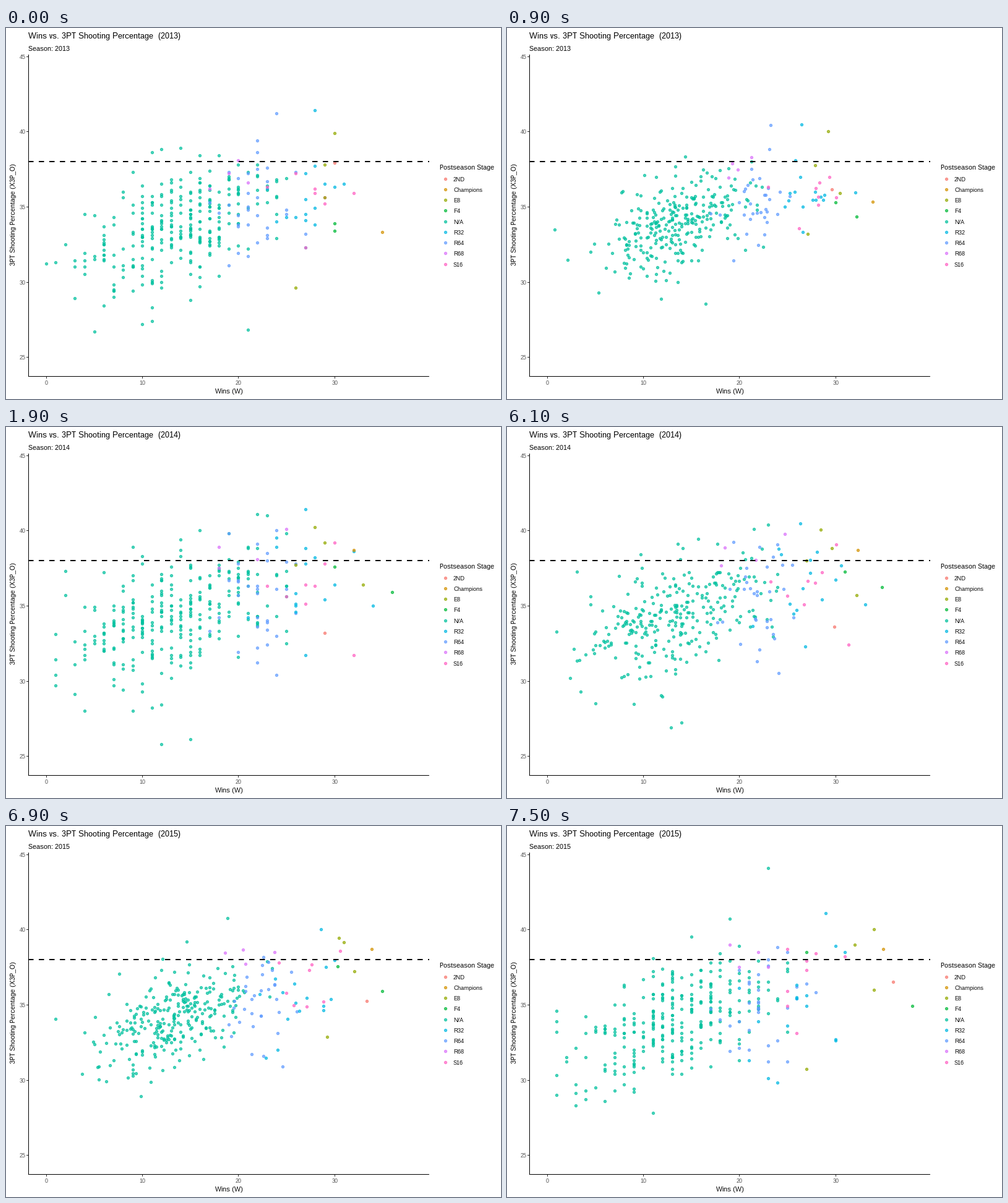
A matplotlib script for the animation above (8000 ms loop, 800 px wide and 600 px high).

```python
import numpy as np
import matplotlib.pyplot as plt
from matplotlib.animation import FuncAnimation
from matplotlib.colors import to_rgba

W, H, DPI = 800, 600, 100
PX = 72 / DPI  # points per pixel
STEP, TOTAL = 100, 8000
STARTS, TWEEN, STEPS = (500, 6100), 200, 8
GREY, TICK = "#4D4D4D", "#333333"

plt.rcParams.update({"font.family": "Liberation Sans",
                     "text.hinting": "native", "text.hinting_factor": 1})
rng = np.random.default_rng(11)

COLORS = {"2ND": "#F8766D", "Champions": "#D39200", "E8": "#93AA00",
          "F4": "#00BA38", "N/A": "#00C19F", "R32": "#00B9E3",
          "R64": "#619CFF", "R68": "#DB72FB", "S16": "#FF61C3"}

# Teams that stand out: wins and percentage in 2013, 2014 and 2015.
KEY_PATHS = {
    "N/A": [(0, 31.2, 2, 37.3, 11, 36.9), (21, 26.8, 9, 31.4, 16, 33.5),
            (24, 35.7, 15, 26.1, 7, 35), (10, 35.3, 12, 25.8, 19, 34.7),
            (16, 34, 12, 35.2, 23, 44.1)],
    "R32": [(28, 41.4, 24, 38.9, 27, 34.9), (26, 34.3, 27, 41.4, 22, 33.9),
            (31, 36.5, 34, 35, 27, 35.6)],
    "2ND": [(30, 37.9, 29, 33.2, 36, 36.5)],
    "Champions": [(35, 33.3, 32, 38.7, 35, 38.7)],
    "E8": [(30, 39.9, 28, 40.2, 32, 39), (29, 37.8, 26, 37.7, 34, 40),
           (29, 35.6, 33, 36.4, 27, 30.7), (26, 29.6, 29, 39.2, 34, 36)],
    "F4": [(30, 33.9, 30, 37.6, 38, 34.9), (30, 33.4, 36, 35.9, 27, 38.5)],
}

# Size of each cloud, then mean and spread of its wins and percentage,
# and the gain in percentage for each win.
CLOUDS = {"N/A": (277, 13.4, 5.2, 33.9, 2.0, 0.22),
          "R64": (32, 22.6, 2.5, 35.3, 2.2, 0.1),
          "R32": (13, 26, 2.8, 35, 2.1, 0.2),
          "R68": (4, 20.5, 2.2, 36.8, 1.5, 0),
          "S16": (8, 26.8, 2.4, 35.9, 2.0, 0.2)}
SHIFTS = (-0.4, 0.4, 0)  # percentage level of each season


def bell(n, limit=2.3):
    return np.clip(rng.normal(size=n), -limit, limit)


def cloud(n, wins, wins_sd, pct, pct_sd, gain):
    """Wins and percentage of n teams, drawn afresh for each season."""
    columns = []
    for shift in SHIFTS:
        w = np.round(wins + wins_sd * bell(n))
        p = pct + shift + gain * (w - wins) + pct_sd * bell(n, 2.8)
        columns += [w, np.round(p, 1)]
    return np.column_stack(columns)


def px(wins):
    return np.floor(65.4 + 15.52 * np.asarray(wins)) + 0.5


def py(pct):
    return np.floor(46.2 + 24.32 * (45 - np.asarray(pct))) + 0.5


groups = [(stage, cloud(*shape)) for stage, shape in CLOUDS.items()]
groups += [(stage, np.array(rows)) for stage, rows in KEY_PATHS.items()]
stages = [stage for stage, rows in groups for _ in rows]
teams = np.vstack([rows for _, rows in groups]).reshape(-1, 3, 2)

fig = plt.figure(figsize=(W / DPI, H / DPI), dpi=DPI, facecolor="white")
ax = fig.add_axes([0, 0, 1, 1])
ax.set(xlim=(0, W), ylim=(H, 0))
ax.axis("off")


def line(x, y, width=1, color="black", **kw):
    ax.plot(x, y, color=color, lw=width * PX, solid_capstyle="butt",
            dash_capstyle="butt", snap=False, **kw)


def label(x, y, text, size=11, color="black", **kw):
    return ax.text(x, y, text, fontsize=size * PX, color=color,
                   va="baseline", **kw)


def dots(x, y, names):
    rgba = [to_rgba(COLORS[n], 0.7) for n in names]
    return ax.scatter(x, y, s=(4.2 * PX) ** 2, facecolors=rgba,
                      edgecolors=rgba, linewidths=1.1 * PX, zorder=2)


LEFT, RIGHT, TOP, BOTTOM = 36.5, 684, 43, 563.5

line([LEFT, LEFT], [TOP, BOTTOM + 0.5], zorder=4)
line([LEFT, RIGHT], [BOTTOM, BOTTOM], zorder=4)
line([LEFT - 0.5, RIGHT], [216, 216], 2, ls=(0, (4.25, 4.25)), zorder=3)
for wins in range(0, 31, 10):
    line([px(wins)] * 2, [BOTTOM, BOTTOM + 3.5], color=TICK)
    label(px(wins), 577, str(wins), 9, GREY, ha="center")
for pct in range(25, 46, 5):
    line([LEFT - 3.5, LEFT], [py(pct)] * 2, color=TICK)
    label(31.5, py(pct) + 3.5, str(pct), 9, GREY, ha="right")

title = label(36, 17, "", 13)
subtitle = label(36, 37, "")
label(360.5, 591, "Wins (W)", ha="center")
label(15, 301.5, "3PT Shooting Percentage (X3P_O)", ha="center",
      rotation=90, rotation_mode="anchor")

label(701, 229, "Postseason Stage")
keys = np.floor(244 + 17.28 * np.arange(len(COLORS))) + 0.5
dots(np.full(len(COLORS), 710.5), keys, COLORS)
for y, stage in zip(keys, COLORS):
    label(723, y + 3.5, stage, 9)

points = dots(px(teams[:, 0, 0]), py(teams[:, 0, 1]), stages)


def progress(ms, start):
    return min(max((ms - start) // TWEEN + 1, 0), STEPS)


def draw(frame):
    a, b = (progress(frame * STEP, start) for start in STARTS)
    first, second, third = teams[:, 0], teams[:, 1], teams[:, 2]
    now = first + (second - first) * a / STEPS + (third - second) * b / STEPS
    points.set_offsets(np.column_stack([px(now[:, 0]), py(now[:, 1])]))
    year = 2013 + (a > STEPS / 2) + (b > STEPS / 2)
    title.set_text(f"Wins vs. 3PT Shooting Percentage  ({year})")
    subtitle.set_text(f"Season: {year}")
    return points, title, subtitle


anim = FuncAnimation(fig, draw, frames=TOTAL // STEP, interval=STEP,
                     repeat=True, repeat_delay=0)
plt.show()
```
